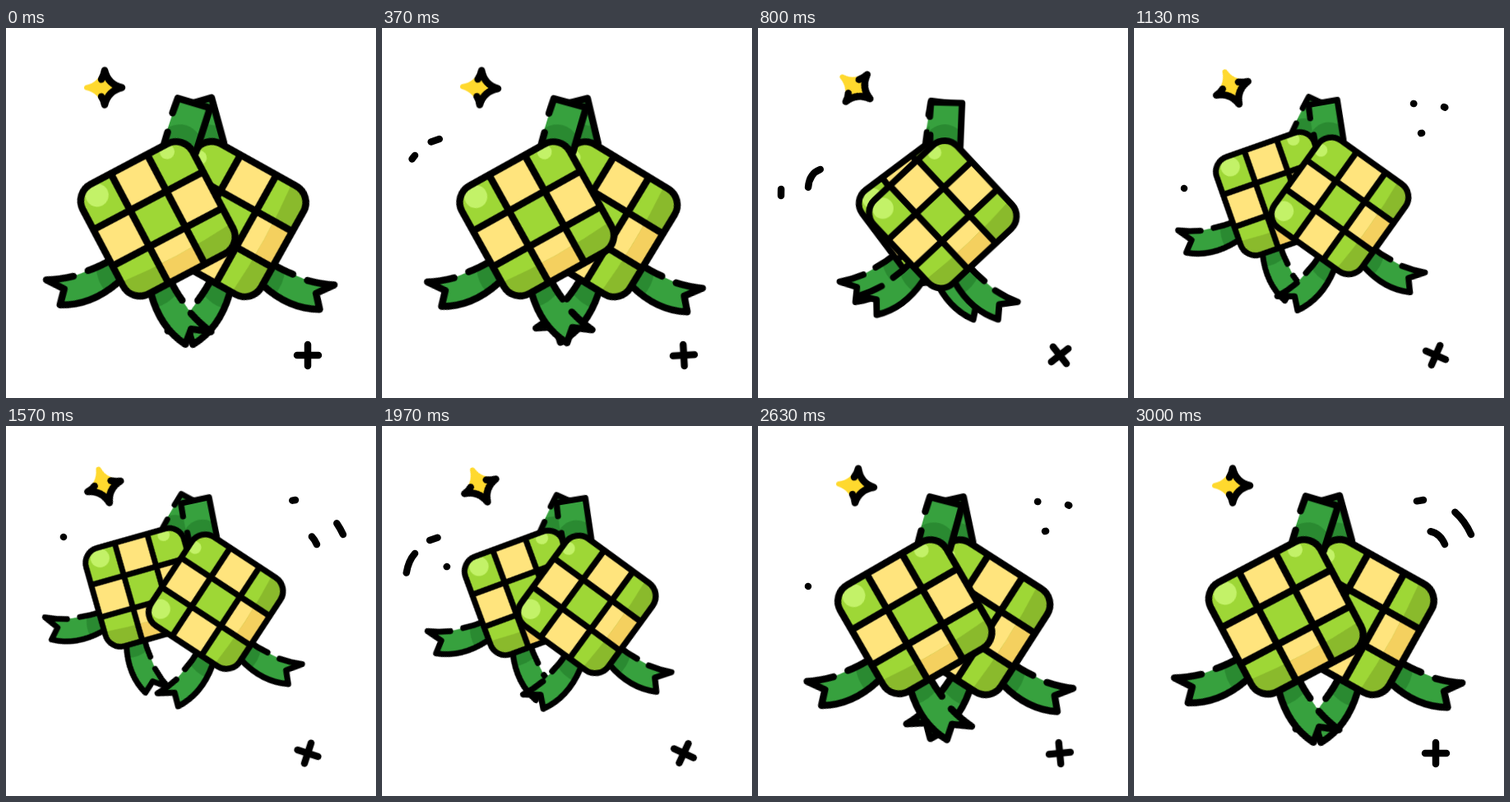
An HTML page for the animation above (3.03 s loop, 450x450 px).

```html
<!DOCTYPE html>
<html lang="en">
<head>
<meta charset="utf-8">
<title>Swinging ketupat</title>
<style>
  html, body { margin: 0; width: 100%; height: 100%; overflow: hidden; background: #fff; }
  svg { display: block; width: 100vw; height: 100vh; }

  @property --head { syntax: '<length>'; inherits: false; initial-value: 0px; }
  @property --tail { syntax: '<length>'; inherits: false; initial-value: 0px; }

  :root { --loop: 3030ms; }

  .line { fill: none; stroke: #000; stroke-width: 8.5; stroke-linecap: round; stroke-linejoin: round; }
  .leaf { fill: #37a13e; }
  .leaf-dark { fill: #2a8a31; }
  .green { fill: #9ed736; }
  .green-dark { fill: #8aba2c; }
  .cream { fill: #ffe47d; }
  .cream-dark { fill: #f4d05f; }
  .shine { fill: #c3f268; }
  .gold { fill: #ffd92e; stroke: #ffd92e; stroke-width: 6; stroke-linejoin: round; }

  /* There and back between two poses, each half a cubic ease in, then out */
  .swing { animation: swing var(--loop) linear infinite; }
  .front { --r0: 16.7deg; --r1: -12.2deg; --k: .854; }
  .back  { --r0: -16.3deg; --r1: 28.7deg; --k: .82; }
  .star  { --r0: 0deg; --r1: 72deg; --k: 1; }
  .plus  { --r0: 0deg; --r1: -72deg; --k: 1; }
  @keyframes swing {
    0%, 100% { transform: rotate(var(--r0)) scale(1); }
    1.155% {
      transform: rotate(var(--r0)) scale(1);
      animation-timing-function: cubic-bezier(.3333, 0, .6667, 0);
    }
    25.908% {
      transform: rotate(calc((var(--r0) + var(--r1)) / 2)) scale(calc((1 + var(--k)) / 2));
      animation-timing-function: cubic-bezier(.3333, 1, .6667, 1);
    }
    50.66% {
      transform: rotate(var(--r1)) scale(var(--k));
      animation-timing-function: cubic-bezier(.3333, 0, .6667, 0);
    }
    75.413% {
      transform: rotate(calc((var(--r0) + var(--r1)) / 2)) scale(calc((1 + var(--k)) / 2));
      animation-timing-function: cubic-bezier(.3333, 1, .6667, 1);
    }
  }

  /* Sparks: the head draws the line, the tail wipes it 250 ms later, twice per loop */
  .spark {
    opacity: 0;
    stroke-dasharray: calc(var(--head) - var(--tail)) 300px;
    stroke-dashoffset: calc(var(--tail) * -1);
    animation:
      head var(--loop) linear var(--s) infinite,
      tail var(--loop) linear calc(var(--s) + 250ms) infinite,
      show var(--loop) step-end var(--s) infinite;
  }
  @keyframes head {
    0%, 49.505% { --head: 0px; animation-timing-function: cubic-bezier(.3333, 0, .6667, 0); }
    8.251%, 57.756% { --head: 50px; animation-timing-function: cubic-bezier(.3333, 1, .6667, 1); }
    16.502%, 33%, 66.007%, 82.5% { --head: 100px; }
    33.01%, 82.51%, 100% { --head: 0px; }
  }
  @keyframes tail {
    0%, 49.505% { --tail: 0px; animation-timing-function: cubic-bezier(.3333, 0, .6667, 0); }
    8.251%, 57.756% { --tail: 50px; animation-timing-function: cubic-bezier(.3333, 1, .6667, 1); }
    16.502%, 33%, 66.007%, 82.5% { --tail: 100px; }
    33.01%, 82.51%, 100% { --tail: 0px; }
  }
  @keyframes show {
    0%, 49.505% { opacity: 1; }
    24.752%, 74.257%, 100% { opacity: 0; }
  }

  /* The right-hand burst is cut off where the loop restarts */
  .cut { animation: cut var(--loop) step-end infinite; }
  @keyframes cut {
    0% { visibility: hidden; }
    10%, 100% { visibility: visible; }
  }
</style>
</head>
<body>
<svg viewBox="0 0 450 450" preserveAspectRatio="none">
  <defs>
    <clipPath id="block"><rect x="-75.5" y="-75.5" width="151" height="151" rx="23"/></clipPath>
    <clipPath id="low"><path d="M-80 47Q0 54 80 46V80H-80Z"/></clipPath>

    <g id="ribbon">
      <path class="leaf" d="M30 208L39 217L60 236L75 248Q90 257 105 262L81 266L80 286Q44 276 21 239L12 222Z"/>
      <path class="leaf-dark" d="M30 208L52 229Q46 245 32 254Q26 247 21 239L12 222Z"/>
      <path class="line" d="M36 214Q48 227 60 236M75 248Q90 257 105 262L81 266L80 286Q44 276 21 239"/>
    </g>

    <!-- Origin is the hanging point -->
    <g id="ketupat">
      <path class="leaf" d="M-19 3H22L21 66H-21Z"/>
      <path class="leaf-dark" d="M-20 40Q0 23 21 40V66H-21Z"/>
      <path class="line" d="M-20 22L-19 3H22L21 60M-19 46V60"/>
      <g transform="rotate(.8)">
        <use href="#ribbon"/>
        <use href="#ribbon" transform="scale(-1 1)"/>
      </g>
      <g transform="translate(0 150.5) rotate(-44.5)">
        <g clip-path="url(#block)">
          <rect class="green" x="-76" y="-76" width="152" height="152"/>
          <path class="cream" d="M-25-76H25V-25H-25ZM-25 25H25V76H-25ZM-76-25H-25V25H-76ZM25-25H76V25H25Z"/>
          <g clip-path="url(#low)">
            <rect class="green-dark" x="-76" y="25" width="152" height="51"/>
            <rect class="cream-dark" x="-25" y="25" width="50" height="51"/>
          </g>
          <circle class="shine" cx="-52" cy="-60" r="14"/>
          <circle class="shine" cx="48" cy="-67" r="9"/>
        </g>
        <path class="line" d="M-25-75V75M25-75V75M-75-25H75M-75 25H75"/>
        <rect class="line" x="-75.5" y="-75.5" width="151" height="151" rx="23"/>
      </g>
    </g>
  </defs>

  <g transform="translate(228 88)">
    <g class="swing back"><use href="#ketupat"/></g>
    <g class="swing front"><use href="#ketupat"/></g>
  </g>

  <g transform="translate(119 72.5)">
    <g class="swing star">
      <path class="gold" d="M1-21Q5-4 22 0Q5 4 1 21Q-4 4-21 0Q-4-4 1-21Z"/>
      <path class="line" d="M-3-10Q0-15 1-21Q5-4 22 0Q5 4 1 21Q0 15-3 11"/>
    </g>
  </g>

  <g transform="translate(367 398)">
    <path class="line swing plus" d="M-13 0H13M0-13V13"/>
  </g>

  <g class="line">
    <path class="spark" style="--s:35ms" pathLength="100" d="M70 135L58 139"/>
    <path class="spark" style="--s:220ms" pathLength="100" d="M40 155C32 164 28 176 28 204"/>
    <path class="spark" style="--s:405ms" pathLength="100" d="M79 171Q62 175 61 195"/>
  </g>
  <g class="line cut" style="--s:1035ms">
    <path class="spark" pathLength="100" d="M340 92L352 90"/>
    <path class="spark" pathLength="100" d="M377 96Q398 106 410 132"/>
    <path class="spark" pathLength="100" d="M349 128Q370 125 378 144"/>
  </g>
</svg>
</body>
</html>
```
